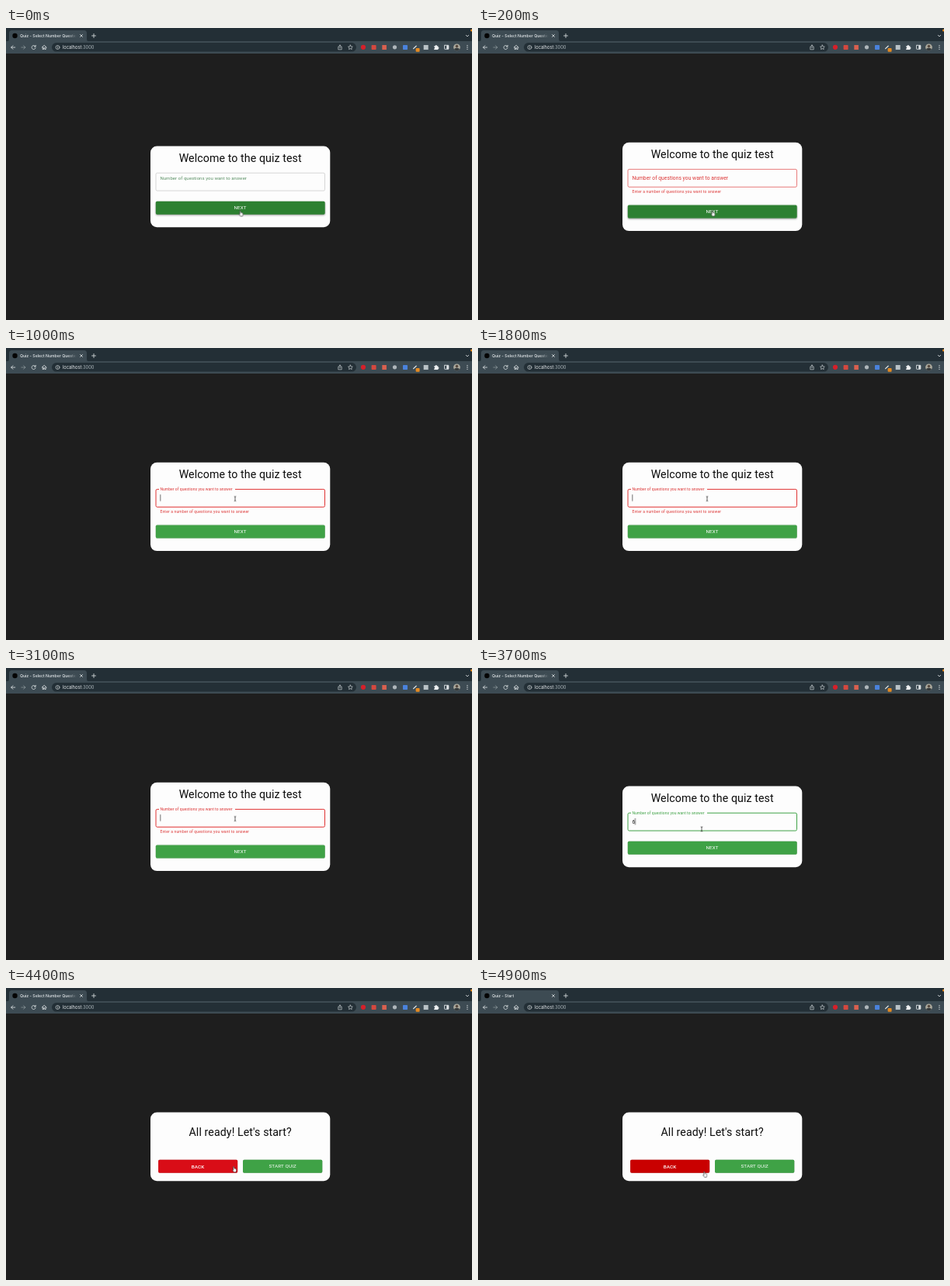
Write an HTML page that moves like this. It is 600x377 px and loops after 5 s.

```html
<!DOCTYPE html>
<html lang="en">
<head>
<meta charset="utf-8">
<title>Quiz</title>
<style>
  html, body { margin: 0; width: 100%; height: 100%; overflow: hidden; background: #1e1e1e; }
  svg { display: block; width: 600px; height: 377px; }
  text { font-family: Roboto, sans-serif; }
  .ui { font-family: Inter, sans-serif; font-size: 5.15px; font-weight: 500; fill: #e6eaec; }
  .url { font-size: 5.75px; font-weight: 400; }
  .line { fill: none; stroke: #e3e7e9; stroke-width: .8; stroke-linecap: round; stroke-linejoin: round; }
  .heading { font-size: 14.17px; letter-spacing: .00735em; text-anchor: middle; fill: #0c0c0c; }
  .btn { font-size: 6.25px; letter-spacing: .027em; text-anchor: middle; fill: #fff; }
  .raised { filter: drop-shadow(0 .6px .7px rgba(0,0,0,.35)); }
  .red { fill: #dc3535; }
  .green { fill: #3fa246; }

  /* every change is a hard step on one five second clock */
  .anim, .anim * { animation: 5s step-end infinite; }
  #longTitle { animation-name: longTitle; }
  #shortTitle { animation-name: shortTitle; }
  #form { animation-name: form; }
  #ready { animation-name: ready; }
  #card { animation-name: card; }
  #top { animation-name: top; }
  #bottom { animation-name: bottom; }
  #helper { animation-name: helper; font-size: 5px; letter-spacing: .0333em; }
  #field { animation-name: field; fill: none; }
  #notch { animation-name: notch; }
  #label { animation-name: label; font-size: 6.67px; letter-spacing: .0094em; }
  #caret { animation-name: caret; }
  #digit { animation-name: digit; font-size: 6.67px; }
  #next { animation-name: next; }
  #back { animation-name: back; }
  #pointer { animation-name: pointer; }
  #hand { animation-name: hand; }
  #beam { animation-name: beam; }
  #arrow { animation-name: arrow; }

  @keyframes longTitle { 0% { opacity: 1 } 90%, 100% { opacity: 0 } }
  @keyframes shortTitle { 0% { opacity: 0 } 90%, 100% { opacity: 1 } }
  @keyframes form { 0% { opacity: 1 } 86%, 100% { opacity: 0 } }
  @keyframes ready { 0% { opacity: 0 } 86%, 100% { opacity: 1 } }
  @keyframes card {
    0%, 70%, 100% { y: 152.5px; height: 104.8px }
    4% { y: 147.7px; height: 114.4px }
  }
  @keyframes top { 0%, 70%, 100% { transform: translateY(0) } 4% { transform: translateY(-4.8px) } }
  @keyframes bottom { 0%, 70%, 100% { transform: translateY(0) } 4% { transform: translateY(4.8px) } }
  @keyframes helper { 0%, 70%, 100% { opacity: 0 } 4% { opacity: 1 } }
  @keyframes field {
    0%, 82%, 100% { stroke: #bcbcbc; stroke-width: .6px }
    4% { stroke: #e04444; stroke-width: .7px }
    16% { stroke: #e03232; stroke-width: 1px }
    70% { stroke: #3fa246; stroke-width: 1px }
  }
  @keyframes notch { 0% { opacity: 0 } 18%, 100% { opacity: 1 } }
  @keyframes label {
    0% { transform: translate(198.4px, 196px) scale(.9); fill: #5a9064 }
    2% { transform: translate(198.4px, 200.9px); fill: #666 }
    4% { transform: translate(198.4px, 200.9px); fill: #dc3535 }
    16% { transform: translate(198.4px, 194.5px) scale(.87); fill: #dc3535 }
    18% { transform: translate(198.4px, 189.2px) scale(.76); fill: #dc3535 }
    20% { transform: translate(198.4px, 188.7px) scale(.75); fill: #dc3535 }
    70% { transform: translate(198.4px, 188.7px) scale(.75); fill: #3fa246 }
    82%, 100% { transform: translate(198.4px, 188.7px) scale(.75); fill: #666 }
  }
  @keyframes caret {
    0%, 26%, 46%, 66% { opacity: 0; transform: none }
    16%, 36%, 56% { opacity: 1; transform: none }
    70% { opacity: 1; transform: translateX(3.6px) }
    80%, 100% { opacity: 0; transform: translateX(3.6px) }
  }
  @keyframes digit { 0% { opacity: 0 } 70%, 100% { opacity: 1 } }
  @keyframes next {
    0%, 80%, 100% { fill: #2d8031; filter: drop-shadow(0 1.1px 1px rgba(0,0,0,.4)) }
    8%, 78% { fill: #36913c; filter: drop-shadow(0 .8px .8px rgba(0,0,0,.38)) }
    10% { fill: #3fa246; filter: drop-shadow(0 .6px .7px rgba(0,0,0,.35)) }
  }
  @keyframes back {
    0% { fill: #ee1020 }
    88% { fill: #d90d17 }
    90% { fill: #ce0407 }
    92%, 100% { fill: #c90000 }
  }
  @keyframes pointer {
    0% { transform: translate(302.5px, 239.5px) }
    6% { transform: translate(302px, 237px) }
    8% { transform: translate(299px, 220px) }
    10% { transform: translate(296.5px, 203px) }
    12% { transform: translate(295.5px, 198.5px) }
    14% { transform: translate(295.2px, 196px) }
    16% { transform: translate(295px, 194.6px) }
    72% { transform: translate(291px, 200px) }
    74% { transform: translate(288px, 208px) }
    76% { transform: translate(288.5px, 217px) }
    78% { transform: translate(291px, 229px) }
    80% { transform: translate(293.5px, 234px) }
    88% { transform: translate(294px, 234.2px) }
    96% { transform: translate(293px, 238px) }
    98%, 100% { transform: translate(292.2px, 240.7px) }
  }
  @keyframes hand { 0%, 78%, 100% { opacity: 1 } 8% { opacity: 0 } }
  @keyframes beam { 0%, 76%, 100% { opacity: 0 } 10% { opacity: 1 } }
  @keyframes arrow { 0%, 10%, 78%, 100% { opacity: 0 } 8%, 76% { opacity: 1 } }
</style>
</head>
<body>
<svg viewBox="0 0 600 377">
  <defs>
    <linearGradient id="fade" gradientUnits="userSpaceOnUse" x1="80" x2="91">
      <stop stop-color="#e6eaec"/><stop offset="1" stop-color="#e6eaec" stop-opacity="0"/>
    </linearGradient>
    <clipPath id="face"><circle cx="580.5" cy="24.8" r="4.4"/></clipPath>
  </defs>
  <rect width="600" height="377" fill="#1e1e1e"/>

  <!-- tab strip -->
  <rect width="600" height="18" fill="#232f36"/>
  <path d="M0 18Q4 18 4 14V6.500Q4 3 7.500 3H100.500Q104 3 104 6.500V14Q104 18 108 18Z" fill="#3d4b53"/>
  <circle cx="11.500" cy="10" r="3.200" fill="#050505"/>
  <g class="anim">
    <text id="longTitle" class="ui" x="18" y="12" style="fill:url(#fade)">Quiz - Select Number Questio</text>
    <text id="shortTitle" class="ui" x="18" y="12">Quiz - Start</text>
  </g>
  <path class="line" d="M95.500 8.500l3 3m0-3l-3 3M110.500 10h5m-2.500-2.500v5M592.300 9.300l1.700 1.700 1.700-1.700"/>
  <circle cx="599.500" cy="3" r="1.500" fill="#e88a1c"/>

  <!-- toolbar -->
  <rect y="17" width="600" height="16" fill="#3d4b53"/>
  <rect x="59" y="19" width="392" height="11.600" rx="5.800" fill="#232f36"/>
  <g class="line">
    <path d="M11.700 25H6.700m2.200-2.300L6.700 25l2.200 2.300"/>
    <path d="M19.800 25h5m-2.200-2.300l2.200 2.300-2.200 2.300" opacity=".45"/>
    <path d="M37.700 23.600a2.500 2.500 0 1 0 .4 2M38.200 22.300v1.700h-1.800"/>
    <path d="M46.300 25l2.900-2.700 2.900 2.700M47.200 24.500v3h1.300v-1.800h1.400v1.800h1.300v-3"/>
    <circle cx="66.500" cy="25" r="2.500" stroke-width=".6"/>
    <path d="M66.500 24.800v1.400M66.500 23.700v.1" stroke-width=".6"/>
    <path d="M428.800 24.200h-1v3.600h4.400v-3.600h-1M430 26v-4m-1.200 1.100l1.200-1.200 1.200 1.200" stroke-width=".6"/>
    <path d="M443.400 22l.9 1.900 2 .3-1.500 1.400.4 2-1.800-1-1.800 1 .4-2-1.500-1.400 2-.3z" stroke-width=".6"/>
    <path d="M524.600 26.600l3.600-3.400" stroke-width="1.200"/>
    <rect x="564.500" y="22.300" width="5.400" height="5" rx=".5"/>
  </g>
  <text class="ui url" x="72.800" y="27">localhost<tspan fill="#aab4b9">:3000</tspan></text>

  <circle cx="460" cy="24.800" r="3.100" fill="#d5202a"/>
  <rect x="470.600" y="22" width="6" height="6" rx=".8" fill="#d4483f"/>
  <rect x="484.300" y="22" width="5.600" height="6" fill="#d9604f"/>
  <circle cx="500.500" cy="24.800" r="2.600" fill="#aeb6ba"/>
  <rect x="511" y="22" width="6" height="6" rx=".8" fill="#4a82dc"/>
  <rect x="527.600" y="26" width="5" height="4.700" rx="1" fill="#e48a22"/>
  <rect x="537.700" y="22" width="6" height="6" fill="#b9c2c6"/>
  <path d="M551.200 23.200h1.500a1.100 1.100 0 1 1 2.200 0h1.500v1.500a1.100 1.100 0 1 1 0 2.200v1.200h-5.200v-1.500a1 1 0 0 0 0-2z" fill="#eef1f2"/>
  <path d="M567.300 22.300h2.600v5h-2.600z" fill="#e3e7e9"/>
  <g clip-path="url(#face)">
    <path d="M575 20h11v10h-11z" fill="#a9a79b"/>
    <circle cx="580.500" cy="23.600" r="1.800" fill="#56483f"/>
    <ellipse cx="580.500" cy="29" rx="3.600" ry="3.200" fill="#343a3c"/>
  </g>
  <g fill="#e3e7e9"><circle cx="594" cy="22.700" r=".65"/><circle cx="594" cy="25" r=".65"/><circle cx="594" cy="27.300" r=".65"/></g>

  <!-- first page -->
  <g class="anim">
    <g id="form">
      <rect id="card" x="186" y="152.500" width="231.300" height="104.800" rx="8.300" fill="#fdfdfd"/>
      <g id="top">
        <text class="heading" x="301.700" y="172.700">Welcome to the quiz test</text>
        <rect id="field" x="193" y="187.200" width="217.500" height="22.900" rx="1.700"/>
        <rect id="notch" x="197" y="186" width="98" height="2.400" fill="#fdfdfd"/>
        <text id="label">Number of questions you want to answer</text>
        <text id="digit" x="198.400" y="201.100" fill="#161616">6</text>
        <rect id="caret" x="198.600" y="193.900" width=".6" height="8.600" fill="#111"/>
      </g>
      <text id="helper" class="red" x="198.400" y="212.700">Enter a number of questions you want to answer</text>
      <g id="bottom">
        <rect id="next" x="192.800" y="223.700" width="217.900" height="17" rx="1.700"/>
        <text class="btn" x="301.600" y="234.400">NEXT</text>
      </g>
    </g>

    <!-- second page -->
    <g id="ready">
      <rect x="186" y="160.500" width="231.300" height="88.800" rx="8.300" fill="#fdfdfd"/>
      <text class="heading" x="301.700" y="190.800">All ready! Let's start?</text>
      <g class="raised"><rect id="back" x="196.100" y="221.700" width="102.100" height="17.100" rx="1.700"/></g>
      <text class="btn" x="247.100" y="232.600" font-weight="500">BACK</text>
      <rect class="raised green" x="305" y="221.700" width="102.300" height="17" rx="1.700"/>
      <text class="btn" x="356.200" y="232.400">START QUIZ</text>
    </g>

    <g id="pointer">
      <path id="hand" d="M-1.600-3.400q.7-.6 1.200.2l.5 2.100 1.500.2 1 .7.100 1.800-.7 1.900H-.6L-2.500.8q0-.9 1.300-.1z" fill="#fff" stroke="#111" stroke-width=".55" stroke-linejoin="round"/>
      <path id="beam" d="M-1.300-3Q0-3 0-2.200Q0-3 1.300-3M0-2.200V2.200M-1.300 3Q0 3 0 2.200Q0 3 1.300 3" fill="none" stroke="#1a1a1a" stroke-width=".7"/>
      <path id="arrow" d="M-2-3.500v6l1.400-1.300.9 2 .9-.4-.9-1.900h1.900z" fill="#111" stroke="#fff" stroke-width=".45"/>
    </g>
  </g>
</svg>
</body>
</html>
```
